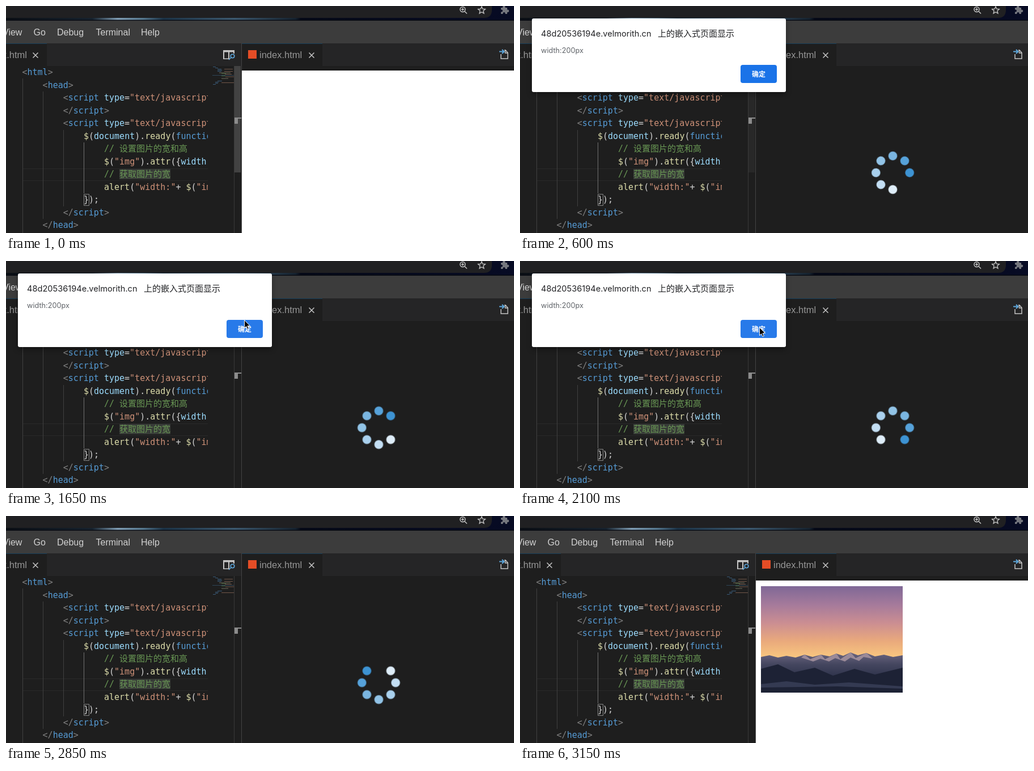
Write an HTML page that moves like this. It is 896 px wide and 401 px high and loops after 4.67 s.

```html
<!DOCTYPE html>
<html lang="zh">
<head>
<meta charset="utf-8">
<title>Editor preview</title>
<style>
html, body { margin: 0; width: 100%; height: 100%; overflow: hidden; background: #1e1e1e; }
svg { display: block; width: 896px; height: 401px; }
text { white-space: pre; }

.ui { font: 16px "Liberation Sans", Arial, sans-serif; fill: #d2d2d2; }
.tab { font-size: 16.5px; fill: #969696; }
.code { font: 15px "DejaVu Sans Mono", "Noto Sans CJK SC", monospace; fill: #d4d4d4; }
.b { fill: #808080; }
.t { fill: #569cd6; }
.a { fill: #9cdcfe; }
.s { fill: #ce9178; }
.c { fill: #6a9955; }
.f { fill: #dcdcaa; }
.line { fill: none; stroke: #c5c5c5; stroke-width: 1.5; }
.guide { fill: none; stroke: #404040; }
.cjk { font-family: "Noto Sans CJK SC", sans-serif; }
.msg { font-family: Inter, "Noto Sans CJK SC", sans-serif; }

.slider, .overlay, .photo, .dialog, .button, .spin, .cursor {
  animation: 4.67s step-end infinite;
}
.slider { animation-name: slider; }
.overlay { animation-name: overlay; }
.photo { animation-name: photo; }
.dialog { animation-name: dialog; filter: drop-shadow(0 4px 5px rgba(0, 0, 0, .35)); }
.button { animation-name: button; }
.spin { animation-name: spin; }
.cursor { animation-name: cursor; }

@keyframes slider {
  0% { opacity: 1; }
  6.42% { opacity: .8; }
  9.63% { opacity: .55; }
  12.84% { opacity: .3; }
  16.05% { opacity: .1; }
  19.27%, 100% { opacity: 0; }
}
@keyframes overlay {
  0% { opacity: 0; }
  3.21% { opacity: 1; }
  64.23% { opacity: .533; }
  67.45%, 100% { opacity: 0; }
}
@keyframes photo {
  0% { opacity: 0; }
  64.23%, 100% { opacity: 1; }
}
@keyframes dialog {
  0% { opacity: 0; transform: none; }
  12.84% { opacity: 1; transform: none; }
  48.17% { opacity: .4; transform: translateY(-12px); }
  51.39%, 100% { opacity: 0; transform: none; }
}
@keyframes button {
  0% { fill: #1a73e8; }
  35.33%, 100% { fill: #287ae9; }
}
@keyframes spin {
  0% { transform: rotate(90deg); }
  6.42% { transform: rotate(135deg); }
  16.05% { transform: rotate(225deg); }
  19.27% { transform: rotate(270deg); }
  22.48% { transform: rotate(315deg); }
  25.69% { transform: rotate(360deg); }
  32.11% { transform: rotate(405deg); }
  35.33% { transform: rotate(450deg); }
  38.54% { transform: rotate(495deg); }
  44.96% { transform: rotate(540deg); }
  48.17% { transform: rotate(585deg); }
  57.81% { transform: rotate(675deg); }
  61.02% { transform: rotate(720deg); }
  64.23%, 100% { transform: rotate(765deg); }
}
@keyframes cursor {
  0% { opacity: 0; transform: translate(577px, 329px); }
  28.9% { opacity: 1; transform: translate(577px, 329px); }
  32.11% { opacity: 1; transform: translate(389px, 162px); }
  35.33% { opacity: 1; transform: translate(420px, 104px); }
  41.75% { opacity: 1; transform: translate(422px, 117px); }
  54.6% { opacity: 1; transform: translate(447px, 129px); }
  57.81% { opacity: 1; transform: translate(830px, 328px); }
  61.02%, 100% { opacity: 0; transform: translate(830px, 328px); }
}
</style>
</head>
<body>
<svg viewBox="0 0 896 401">
  <defs>
    <linearGradient id="stars">
      <stop offset="0" stop-color="#0a0e14"/>
      <stop offset=".17" stop-color="#16222e"/>
      <stop offset=".22" stop-color="#7f9db4"/>
      <stop offset=".27" stop-color="#56788f"/>
      <stop offset=".31" stop-color="#1b3347"/>
      <stop offset=".45" stop-color="#3d5a70"/>
      <stop offset=".57" stop-color="#15222f"/>
      <stop offset=".58" stop-color="#050917"/>
      <stop offset="1" stop-color="#070b24"/>
    </linearGradient>
    <linearGradient id="sky" x2="0" y2="1">
      <stop offset="0" stop-color="#7f6896"/>
      <stop offset=".25" stop-color="#a57a9b"/>
      <stop offset=".5" stop-color="#cb8e92"/>
      <stop offset=".75" stop-color="#eaaa7c"/>
      <stop offset="1" stop-color="#fbcb80"/>
    </linearGradient>
    <linearGradient id="hills" x2="0" y2="1">
      <stop offset="0" stop-color="#6b6580"/>
      <stop offset=".3" stop-color="#44465f"/>
      <stop offset=".65" stop-color="#2b3048"/>
      <stop offset="1" stop-color="#20263a"/>
    </linearGradient>
    <clipPath id="codeArea"><path d="M0 106H356V401H0Z"/></clipPath>
    <path id="close" d="M-4.5-4.5 4.5 4.5M4.5-4.5-4.5 4.5" class="line"/>
  </defs>

  <!-- browser bar -->
  <path fill="url(#stars)" d="M0 0H896V26H0Z"/>
  <path fill="#202022" d="M0 0H857V7Q857 21 843 21H0Z"/>
  <path fill="#0b0d14" d="M0 24.5H896V26H0Z"/>
  <g class="line">
    <circle cx="805.5" cy="6" r="4.5"/>
    <path d="M809 9.500 813 13.500M803 6H808M805.500 3.500V8.500"/>
    <path stroke-width="1.4" d="M839 1 840.800 5.200 845.300 5.600 841.900 8.600 842.900 13 839 10.700 835.100 13 836.100 8.600 832.700 5.600 837.200 5.200Z"/>
  </g>
  <path fill="#75777e" d="M873 3H876V2A2.300 2.300 0 0 1 880.600 2V3H884V6.500H885A2.200 2.200 0 0 1 885 11H884V14H880.500V13A2 2 0 0 0 876.500 13V14H873V10.500H874A2 2 0 0 0 874 6.500H873Z"/>

  <!-- menu -->
  <path fill="#3c3c3c" d="M0 26H896V66H0Z"/>
  <g class="ui">
    <text x="-6" y="52">View</text>
    <text x="48.500" y="52">Go</text>
    <text x="90" y="52">Debug</text>
    <text x="158.500" y="52">Terminal</text>
    <text x="238" y="52">Help</text>
  </g>

  <!-- tabs -->
  <path fill="#252526" d="M0 66H896V106H0Z"/>
  <path fill="#1e1e1e" d="M0 66H72V106H0ZM416 66H558V106H416Z"/>
  <path fill="#163d59" d="M0 66H72V67H0ZM416 66H558V67H416Z"/>
  <text class="ui tab" x="37" y="92" text-anchor="end">index.html</text>
  <text class="ui tab" x="447" y="92">index.html</text>
  <use href="#close" x="52" y="87"/>
  <use href="#close" x="539" y="87"/>
  <path fill="#e44d26" d="M427 78H442V93H427Z"/>
  <path fill="#c5c5c5" d="M383 78H403V84H401V81.500H394V94H383ZM385 81.500V92.500H392V81.500Z" fill-rule="evenodd"/>
  <g fill="none" stroke="#5fa8dc" stroke-width="1.600">
    <circle cx="399.500" cy="88.500" r="3.300"/>
    <path d="M397 91 393 95"/>
  </g>
  <path class="line" d="M873 85V93H885V82.500L881 78H879M880.500 78V83H885"/>
  <path fill="none" stroke="#5fa8dc" stroke-width="2" d="M870 80.500H878M875 77 878.500 80.500 875 84"/>

  <!-- editor -->
  <path fill="#1e1e1e" d="M0 106H896V401H0Z"/>
  <path fill="none" stroke="#292929" d="M30 287.500H356M30 308.500H356"/>
  <path fill="#383c38" d="M200 288H290V306H200Z"/>
  <path class="guide" d="M29.500 128V401M65.500 151V376M101.500 219V354"/>
  <path class="guide" stroke="#707070" style="stroke:#707070" d="M137.500 241V331"/>
  <path fill="none" stroke="#888" d="M137.500 332.500H146.500V352.500H137.500Z"/>
  <g class="code" clip-path="url(#codeArea)">
    <text x="28.500" y="122"><tspan class="b">&lt;</tspan><tspan class="t">html</tspan><tspan class="b">&gt;</tspan></text>
    <text x="64.600" y="144.500"><tspan class="b">&lt;</tspan><tspan class="t">head</tspan><tspan class="b">&gt;</tspan></text>
    <text x="100.700" y="167"><tspan class="b">&lt;</tspan><tspan class="t">script</tspan> <tspan class="a">type</tspan>=<tspan class="s">"text/javascript"</tspan></text>
    <text x="100.700" y="189.500"><tspan class="b">&lt;/</tspan><tspan class="t">script</tspan><tspan class="b">&gt;</tspan></text>
    <text x="100.700" y="212"><tspan class="b">&lt;</tspan><tspan class="t">script</tspan> <tspan class="a">type</tspan>=<tspan class="s">"text/javascript"</tspan></text>
    <text x="136.900" y="234.500"><tspan class="f">$</tspan>(<tspan class="a">document</tspan>).<tspan class="f">ready</tspan>(<tspan class="t">function</tspan></text>
    <text x="173" y="257" class="c">// <tspan class="cjk">设置图片的宽和高</tspan></text>
    <text x="173" y="279.500"><tspan class="f">$</tspan>(<tspan class="s">"img"</tspan>).<tspan class="f">attr</tspan>({<tspan class="a">width</tspan>:</text>
    <text x="173" y="302" class="c">// <tspan class="cjk">获取图片的宽</tspan></text>
    <text x="173" y="324.500"><tspan class="f">alert</tspan>(<tspan class="s">"width:"</tspan>+ <tspan class="f">$</tspan>(<tspan class="s">"img"</tspan>)</text>
    <text x="136.900" y="347">});</text>
    <text x="100.700" y="369.500"><tspan class="b">&lt;/</tspan><tspan class="t">script</tspan><tspan class="b">&gt;</tspan></text>
    <text x="64.600" y="392"><tspan class="b">&lt;/</tspan><tspan class="t">head</tspan><tspan class="b">&gt;</tspan></text>
  </g>

  <!-- minimap and ruler -->
  <g fill="none" stroke-width="1.200" opacity=".75">
    <path stroke="#426f96" d="M365 107.500H370M369 109.500H374M373 111.500H380M373 113.500H381M373 115.500H380M373 132.500H381M369 134.500H375M369 136.500H374M365 138.500H370"/>
    <path stroke="#8d6a59" d="M385 111.500H400M385 115.500H400M386 120.500H398M387 125H402M380 135.500H402"/>
    <path stroke="#8a8a70" d="M376 118H396M380 128H392"/>
    <path stroke="#557a48" d="M380 119.500H388M380 123.500H387"/>
    <path stroke="#34536b" d="M364 122.500H402"/>
  </g>
  <path fill="#424242" d="M403 106H414V294H403Z" class="slider"/>
  <path fill="none" stroke="#3a3a3a" d="M402.500 106V401"/>
  <path fill="#8c8c8c" d="M403 197H415V199H409V208H403Z"/>
  <path fill="none" stroke="#444" d="M415.500 66V401"/>

  <!-- preview -->
  <path fill="#fff" d="M416 114H896V401H416Z"/>
  <g class="photo">
    <path fill="url(#sky)" d="M425 124H675V254H425Z"/>
    <path fill="url(#hills)" d="M425 249 440 246 455 250 470 247 486 250 502 245 516 249 531 245 546 248 558 243 570 247 583 241 596 246 611 242 626 248 642 245 658 249 675 246V312H425Z"/>
    <path fill="#9b8a98" d="M496 250 502 245 512 253 531 245 538 253 558 243 565 253 583 241 592 251 611 242 622 252 606 249 598 256 583 250 573 257 556 251 545 257 530 252 517 257Z"/>
    <path fill="#1d2235" d="M425 270 455 262 484 276 520 268 552 282 590 270 626 280 675 268V312H425Z"/>
    <path fill="#343a52" d="M425 297 470 292 520 298 580 294 675 301V305L560 301 425 303Z"/>
  </g>
  <g class="overlay">
    <path fill="#1e1e1e" d="M416 114H896V401H416Z"/>
    <g transform="translate(657.500 294.500)">
      <g class="spin">
        <circle cy="-29.700" r="7.800" fill="#3d93d3" transform="rotate(-45)"/>
        <circle cy="-29.700" r="7.800" fill="#56a2da" transform="rotate(-90)"/>
        <circle cy="-29.700" r="7.800" fill="#7ab5e0" transform="rotate(-135)"/>
        <circle cy="-29.700" r="7.800" fill="#91c3e6" transform="rotate(-180)"/>
        <circle cy="-29.700" r="7.800" fill="#a9d0ed" transform="rotate(-225)"/>
        <circle cy="-29.700" r="7.800" fill="#c3def3" transform="rotate(-270)"/>
        <circle cy="-29.700" r="7.800" fill="#deedf8" transform="rotate(-315)"/>
      </g>
    </g>
  </g>

  <!-- alert -->
  <g class="dialog">
    <rect x="21" y="22" width="448" height="130" rx="3" fill="#fff"/>
    <g class="msg">
      <text x="37" y="54" font-size="14.600" fill="#202124">48d20536194e.velmorith.cn</text>
      <text x="243" y="54" font-size="15" fill="#202124" class="cjk">上的嵌入式页面显示</text>
      <text x="37" y="83" font-size="12.700" fill="#5f6368">width:200px</text>
    </g>
    <rect class="button" x="389" y="104" width="64" height="32" rx="4"/>
    <text class="cjk" x="421" y="124.500" font-size="12" font-weight="700" fill="#fff" text-anchor="middle">确定</text>
  </g>

  <path class="cursor" fill="#000" stroke="#fff" d="M.5.5V14.500L3.700 11.600 5.900 16.500 8.200 15.500 6 10.700H10.500Z"/>
</svg>
</body>
</html>
```
